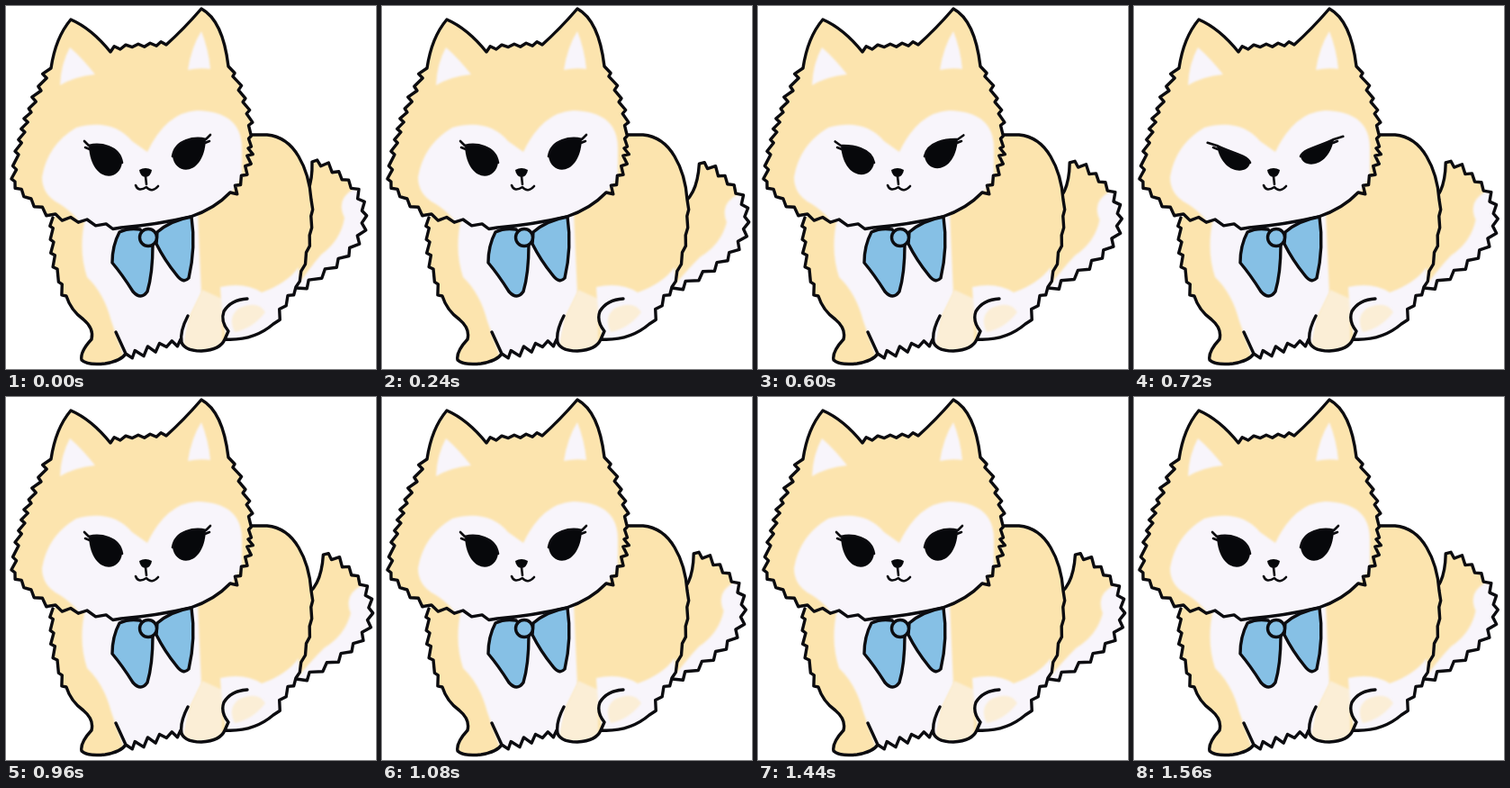
Recreate the animation shown at these times as an HTML page. Size 411 by 403 pixels, loop 1.68 s.

```html
<!DOCTYPE html>
<html lang="en">
<head>
<meta charset="utf-8">
<title>Puppy wagging its tail</title>
<style>
  html, body { margin: 0; width: 100%; height: 100%; overflow: hidden; background: #fff; }
  svg { display: block; width: 100vw; height: 100vh; }
  .coat { fill: #fce4ae; }
  .pale { fill: #f8f5fb; filter: url(#soft); }
  .cream { fill: #fbeed6; filter: url(#soft); }
  .ink { fill: none; stroke: #0c0c10; stroke-width: 3.4; stroke-linecap: round; stroke-linejoin: round; }
  .thin { stroke-width: 2.6; }
  .bow { fill: #86c0e5; }
  .dark { fill: #07080b; }
</style>
</head>
<body>
<svg viewBox="0 0 411 403" preserveAspectRatio="none">
  <defs><filter id="soft"><feGaussianBlur stdDeviation="1.2"/></filter></defs>
  <g id="tail"></g>
  <g id="body"></g>
  <g id="head"></g>
  <g id="eyes">
    <g transform="translate(110 170)"><path class="dark"/><path class="ink thin"/></g>
    <g transform="translate(204 163) scale(-1 1)"><path class="dark"/><path class="ink thin"/></g>
  </g>
  <path class="dark" d="M148 182Q155 178 162 182Q161 189 155 190Q149 189 148 182Z"/>
  <path class="ink thin" d="M155 189L156 198M144 199Q147 207 156 201Q162 208 169 200"/>
  <g class="bow ink" style="fill:#86c0e5">
    <path d="M149 248Q136 246 126 251Q118 266 118 285Q129 298 141 317Q150 327 157 317Q163 297 163 265Z"/>
    <path d="M168 251Q183 238 206 234Q211 268 203 302Q197 309 189 298Q176 282 167 264Z"/>
    <circle cx="158" cy="257" r="9.5"/>
  </g>
</svg>

<script>
const STEP = 120, STEPS = 14;
const clamp = (v, lo, hi) => Math.min(hi, Math.max(lo, v));

let seed = 7;
const random = () => (seed = (seed * 16807) % 2147483647) / 2147483647;

// Catmull-Rom point at t (0..1) along the key points.
function along(pts, t) {
  const last = pts.length - 1;
  const i = Math.min(Math.floor(t * last), last - 1), u = t * last - i;
  const [a, b, c, d] = [-1, 0, 1, 2].map(k => pts[clamp(i + k, 0, last)]);
  return [0, 1].map(k => b[k] + u / 2 * (c[k] - a[k]
    + u * (2 * a[k] - 5 * b[k] + 4 * c[k] - d[k]
    + u * (3 * (b[k] - c[k]) + d[k] - a[k]))));
}

// Ragged edge: tufts stand to the left of the direction of travel.
function fur(pts, tufts, depth, lean) {
  let d = '';
  for (let i = 0; i < tufts; i++) {
    const [ax, ay] = along(pts, i / tufts), [bx, by] = along(pts, (i + 1) / tufts);
    const dx = bx - ax, dy = by - ay;
    const h = depth * (0.7 + 0.6 * random()) / Math.hypot(dx, dy);
    const tip = [ax + dx * lean + dy * h, ay + dy * lean - dx * h];
    d += `L${tip.map(v => v.toFixed(1))}L${bx.toFixed(1)} ${by.toFixed(1)}`;
  }
  return d;
}

const path = (cls, d) => `<path class="${cls}" d="${d}"/>`;

function furry(id, outline, patches, lines = '') {
  document.getElementById(id).innerHTML =
    `<clipPath id="${id}Clip"><path d="${outline}"/></clipPath>` + path('coat', outline) +
    `<g clip-path="url(#${id}Clip)">${patches}</g>` + path('ink', outline + lines);
}

furry('tail',
  'M320 222Q341 212 340 173' +
  fur([[340, 173], [364, 186], [386, 206], [396, 234], [385, 264], [357, 290], [322, 313]], 13, 6, 0.4),
  path('pale', 'M386 203Q366 215 376 235Q372 260 350 276Q338 290 322 313L400 330 425 215Z'));

furry('body',
  'M52 235' + fur([[52, 235], [53, 262], [57, 292], [67, 322]], 6, -4, 0.8) +
  'Q72 338 86 348Q98 358 95 370Q82 384 84 393Q90 399 110 397Q128 394 133 386' +
  fur([[133, 386], [164, 376], [194, 370]], 5, -7, 0.5) +
  'Q196 383 217 383Q238 382 243 370Q275 372 297 353' +
  fur([[297, 353], [308, 328], [322, 312]], 3, -4, 0.4) +
  fur([[322, 312], [332, 280], [338, 248], [339, 215]], 5, -2, 0.4) +
  'Q337 187 325 167Q312 145 290 143L272 143',
  path('pale', 'M88 236Q80 270 90 301Q109 319 117 350L132 392 197 388 204 345 217 319 213 230Z') +
  path('cream', 'M204 345L218 315 240 325 240 385 194 388Z') +
  path('pale', 'M238 312Q265 306 284 318Q312 308 325 290L330 350 246 374 240 345Z') +
  path('cream', 'M258 336Q280 326 288 340Q274 358 254 362Q246 346 258 336Z'),
  'M122 362L133 386M202 344Q193 361 195 373M243 370L247 361Q238 350 242 339Q250 326 268 325');

furry('head',
  'M50 69Q55 35 72 15Q95 25 116 51' +
  fur([[116, 51], [136, 46], [158, 45], [178, 43]], 5, 4, 0.5) +
  'Q198 25 217 3Q241 16 247 67' +
  fur([[247, 67], [260, 98], [269, 128], [269, 158]], 7, 4, 0.8) +
  fur([[269, 158], [264, 183], [249, 207]], 5, 6, 0.7) +
  'Q232 225 205 234Q166 243 128 246' +
  fur([[128, 246], [90, 237], [55, 231], [28, 214], [10, 195]], 8, 5, 0.5) +
  fur([[10, 195], [14, 165], [21, 140], [28, 118], [39, 94], [50, 69]], 10, 5, 0.2) + 'Z',
  path('pale', 'M71 46Q84 57 99 76Q77 78 60 88Q61 64 71 46Z') +
  path('pale', 'M217 28Q225 48 227 70Q216 68 202 71Q206 45 217 28Z') +
  path('pale', 'M40 190Q46 154 78 135Q118 124 140 150L157 162Q178 118 212 116' +
    'Q262 117 262 158V190L215 260H90Q85 236 60 220Q40 210 40 190Z'));

// Eyelids in outer-to-inner coordinates; shut runs from 0 to 1.
function drawEyes(shut) {
  const lid = `M-18 -15C-6 ${-18 + 22 * shut} 16 ${-15 + 23 * shut} 19 4`;
  const lower = `C16 ${26 - 17 * shut} ${-16 + 8 * shut} ${26 - 21 * shut} -18 -15Z`;
  const lash = `M-18 -15L${-23 - 12 * shut} ${-20 + 4 * shut}M-17 -11L-22 -13`;
  for (const eye of document.getElementById('eyes').children) {
    eye.children[0].setAttribute('d', lid + lower);
    eye.children[1].setAttribute('d', lid + lash);
  }
}

function draw(now) {
  const step = Math.floor(now / STEP) % STEPS;
  // The wag holds for two steps while the eyes close.
  const beat = step - clamp(step - 5, 0, 2);
  const wag = (1 - Math.cos(beat * Math.PI / 2)) / 2;
  const blink = clamp(step - 4, 0, 4) % 4 / 3;
  document.getElementById('tail').setAttribute('transform', `rotate(${5 * wag} 322 316)`);
  drawEyes(blink * blink);
  requestAnimationFrame(draw);
}
draw(performance.now());
</script>
</body>
</html>
```
